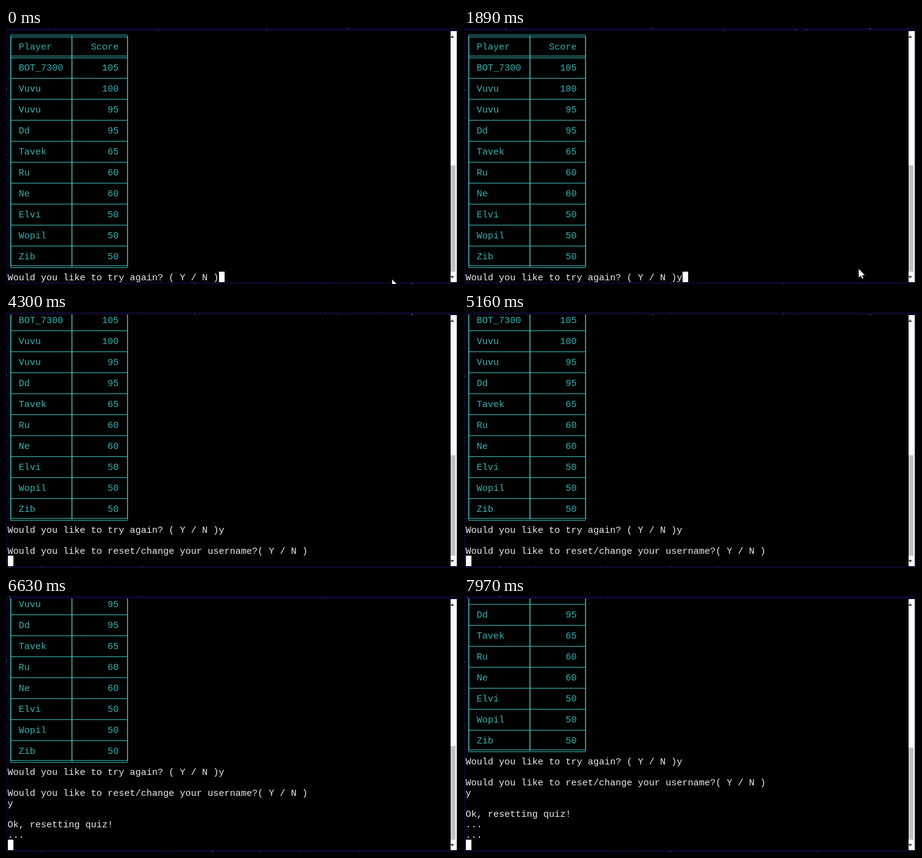
An HTML page with a canvas for the animation above (8000 ms loop, 732 px wide and 415 px high).

```html
<!DOCTYPE html>
<html lang="en">
<head>
<meta charset="utf-8">
<title>Quiz terminal</title>
<style>
  html, body { margin: 0; width: 100%; height: 100%; overflow: hidden; background: #0b0722; }
  canvas { display: block; }
</style>
</head>
<body>
<canvas id="stage" width="732" height="415"></canvas>
<script>
const ctx = document.getElementById("stage").getContext("2d");
const LOOP = 8000, WIDTH = 732, HEIGHT = 415;
const ROWS = 24, CELL_W = 9, CELL_H = 17, LEFT = 3, TOP = 4;
const CYAN = "#2eb3b2", LINE = "#3dbdbb", WHITE = "#ececec";

// Score table
const scores = [
  ["BOT_7300", 105], ["Vuvu", 100], ["Vuvu", 95], ["Dd", 95], ["Tavek", 65],
  ["Ru", 60], ["Ne", 60], ["Elvi", 50], ["Wopil", 50], ["Zib", 50],
];
const rule = (l, fill, mid, r) => l + fill.repeat(10) + mid + fill.repeat(9) + r;
const entry = ([name, score]) => `│ ${name.padEnd(8)} │ ${String(score).padStart(7)} │`;
const table = [
  rule("╒", "═", "╤", "╕"),
  entry(["Player", "Score"]),
  rule("╞", "═", "╪", "╡"),
  scores.map(entry).join("\n" + rule("├", "─", "┼", "┤") + "\n"),
  rule("╘", "═", "╧", "╛"),
].join("\n");

// Terminal output: start time, text, milliseconds per character
const output = [
  [0, table + "\nWould you like to try again? ( Y / N )", 0],
  [1600, "y", 0],
  [2985, "\n\n", 0],
  [3030, "Would you like to reset/change your username?( Y / N )\n", 20],
  [5600, "y", 0],
  [6080, "\n\n", 0],
  [6110, "Ok, resetting quiz!\n...\n", 20],
  [7560, "...\n", 20],
];

function textAt(t) {
  return output.map(([start, text, pace]) => {
    if (t < start) return "";
    return pace ? text.slice(0, Math.floor((t - start) / pace)) : text;
  }).join("");
}

// Arms of each box character: up, down, left, right; capitals are double
const arms = {
  "│": "ud", "─": "lr", "═": "LR", "├": "udr", "┼": "udlr", "┤": "udl",
  "╒": "dR", "╤": "dLR", "╕": "dL", "╞": "udR", "╪": "udLR", "╡": "udL",
  "╘": "uR", "╧": "uLR", "╛": "uL",
};

function rect(color, x, y, w, h) {
  ctx.fillStyle = color;
  ctx.fillRect(x, y, w, h);
}

function drawBox(char, x, y) {
  const midX = x + 4, midY = y + 9;
  for (const arm of arms[char]) {
    if (arm === "u") rect(LINE, midX, y, 1.5, 9);
    else if (arm === "d") rect(LINE, midX, midY, 1.5, 8);
    else {
      const startX = arm.toLowerCase() === "l" ? x : midX;
      const offsets = arm === arm.toUpperCase() ? [-2, 1] : [0];
      for (const dy of offsets) rect(LINE, startX, midY + dy, 5, 1);
    }
  }
}

function drawLine(text, row) {
  const y = TOP + row * CELL_H;
  const inTable = text[0] in arms;
  [...text].forEach((char, col) => {
    const x = LEFT + col * CELL_W;
    if (char in arms) return drawBox(char, x, y);
    ctx.fillStyle = inTable ? CYAN : WHITE;
    ctx.fillText(char, x - 0.5, y + 14);
  });
}

// Starry desktop visible around the window
let seed = 17;
const random = () => (seed = (seed * 16807) % 2147483647) / 2147483647;
const stars = Array.from({ length: 1500 }, () => ({
  x: random() * WIDTH, y: random() * HEIGHT, size: 0.6 + random() * 1.6, glow: random() ** 2 * 0.6,
}));

function drawSky(t) {
  rect("#0b0722", 0, 0, WIDTH, HEIGHT);
  for (const { x, y, size, glow } of stars) {
    rect(`rgba(150,140,200,${glow})`, x, (y + t / 1000) % HEIGHT, size, size);
  }
}

function triangle(x, y, dy) {
  ctx.fillStyle = "#505050";
  ctx.beginPath();
  ctx.moveTo(x - 3.5, y);
  ctx.lineTo(x + 3.5, y);
  ctx.lineTo(x, y + dy);
  ctx.fill();
}

function drawScrollbar(scrolled) {
  const thumb = 373 * ROWS / (52 + scrolled);
  rect("#fafafa", 720, 5, 10, 407);
  rect("#c1c1c1", 720, 395 - thumb, 8, thumb);
  triangle(722.5, 16, -4);
  triangle(722.5, 402, 4);
}

function drawPointer(t) {
  if (t > 2985) return;
  const p = Math.min(t / 700, 1), ease = p * p * (3 - 2 * p);
  const shape = [[0, 0], [0, 15], [3.5, 12], [6, 17], [8, 16], [5.8, 11], [10.5, 11]];
  ctx.beginPath();
  for (const [x, y] of shape) ctx.lineTo(625 + 14 * ease + x, 407 - 17 * ease + y);
  ctx.closePath();
  ctx.fillStyle = "#fff";
  ctx.fill();
  ctx.strokeStyle = "#000";
  ctx.lineWidth = 0.6;
  ctx.stroke();
}

function draw(t) {
  drawSky(t);
  rect("#000", 2, 5, 718, 407);
  const lines = textAt(t).split("\n");
  const scrolled = lines.length - ROWS;
  ctx.font = '15px "Liberation Mono", monospace';
  lines.slice(-ROWS).forEach(drawLine);
  rect("#fff", LEFT + lines.at(-1).length * CELL_W, TOP + (ROWS - 1) * CELL_H, CELL_W, CELL_H);
  drawScrollbar(scrolled);
  drawPointer(t);
}

const began = performance.now();
function tick() {
  draw((performance.now() - began) % LOOP);
  requestAnimationFrame(tick);
}
tick();
</script>
</body>
</html>
```
